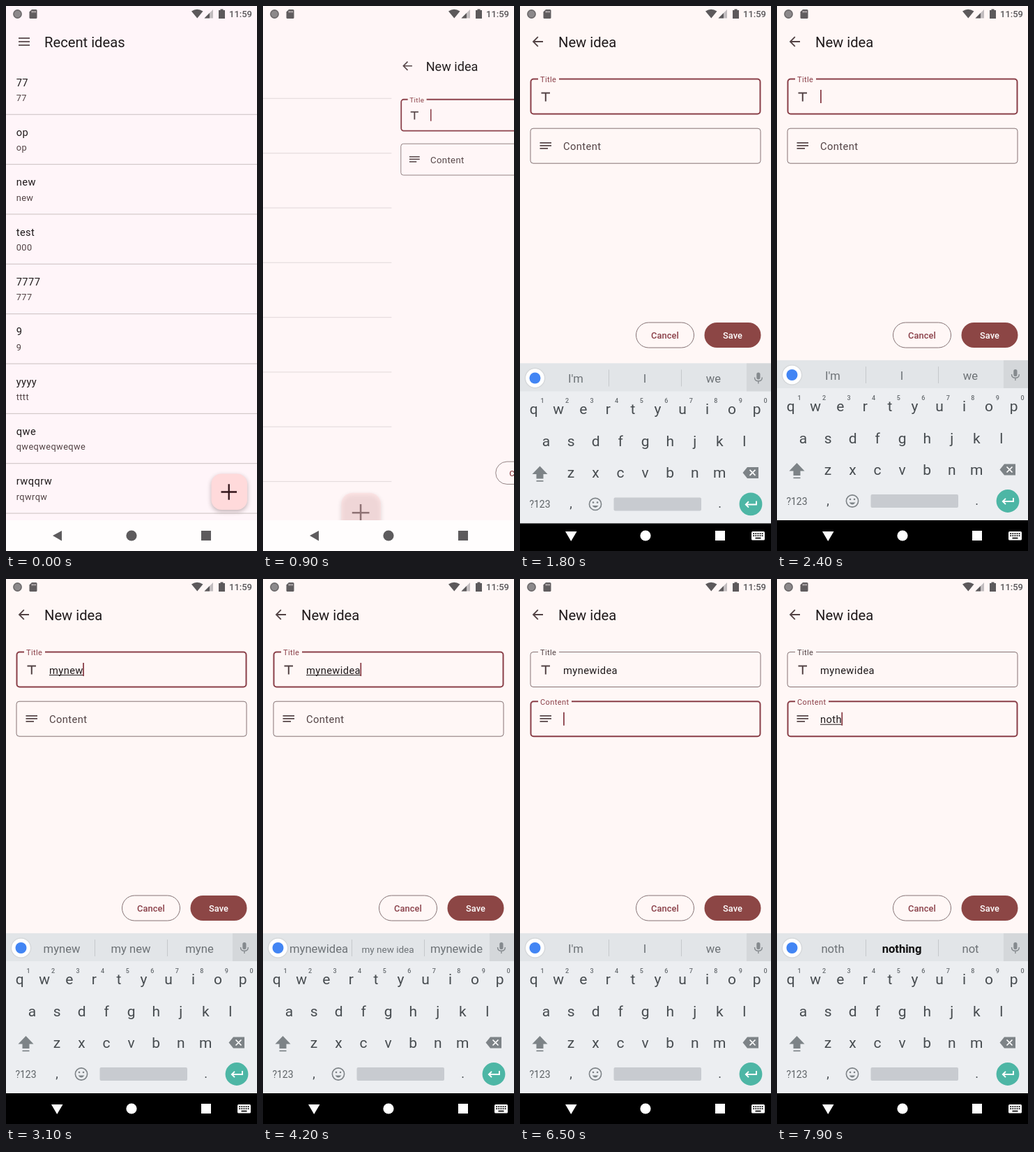
Recreate the animation shown at these times as an HTML page with a canvas. Size 360 by 780 pixels, loop 8 s.

```html
<!DOCTYPE html>
<html lang="en">
<head>
<meta charset="utf-8">
<title>New idea</title>
<style>
html, body { margin: 0; width: 100%; height: 100%; overflow: hidden; background: #fff7f6; }
canvas { display: block; }
</style>
</head>
<body>
<canvas id="stage" width="360" height="780"></canvas>
<script>
const ctx = document.getElementById('stage').getContext('2d');
const LOOP = 8000;
const BG = '#fff7f6', INK = '#1f1a1b', SOFT = '#534345', RED = '#8a3f48', KEY = '#474c50', GREY = '#7d8387';
const ITEMS = [['77', '77'], ['op', 'op'], ['new', 'new'], ['test', '000'], ['7777', '777'], ['9', '9'],
  ['yyyy', 'tttt'], ['qwe', 'qweqweqweqwe'], ['rwqqrw', 'rqwrqw']];

// Key times for each typed character
const TITLE = { word: 'mynewidea', times: [2500, 2600, 2800, 2900, 3000, 3500, 3700, 3800, 4000] };
const CONTENT = { word: 'noth', times: [7500, 7600, 7800, 7900] };
const FOCUS_SWITCH = 4800;
const CARET_OFF = [[1200, 1500], [1700, 2200], [4500, 4800], [5200, 5700], [6200, 6500], [6800, 7100]];
const HINTS = {
  '': ["I'm", 'I', 'we'], m: ['m', 'my', 'me'], my: ['my', 'mom', 'myself'], myn: ['myn', 'my', 'mine'],
  myne: ['myne', 'mine', 'my new'], mynew: ['mynew', 'my new', 'myne'],
  n: ['n', 'no', 'not'], no: ['no', 'not', 'now'], not: ['not', 'nothing', 'note'], noth: ['noth', 'nothing', 'not']
};

const clamp = v => Math.max(0, Math.min(1, v));
const easeInOut = u => u * u * (3 - 2 * u);
const typed = (field, t) => field.word.slice(0, field.times.filter(k => k <= t).length);

function text(str, x, y, size, color, { weight = 400, align = 'left', gap = 0 } = {}) {
  ctx.font = `${weight} ${size}px Roboto, sans-serif`;
  ctx.letterSpacing = gap + 'px';
  ctx.textAlign = align;
  ctx.fillStyle = color;
  ctx.fillText(str, x, y);
  return ctx.measureText(str).width;
}
function rect(x, y, w, h, color) {
  ctx.fillStyle = color;
  ctx.fillRect(x, y, w, h);
}
function round(x, y, w, h, r, fill, stroke, line = 1) {
  ctx.beginPath();
  ctx.roundRect(x, y, w, h, r);
  paint(fill, stroke, line);
}
function circle(x, y, r, fill, stroke, line = 1) {
  ctx.beginPath();
  ctx.arc(x, y, r, 0, 7);
  paint(fill, stroke, line);
}
function path(d, fill, stroke, line = 1) {
  const p = new Path2D(d);
  if (fill) { ctx.fillStyle = fill; ctx.fill(p); }
  if (stroke) { ctx.strokeStyle = stroke; ctx.lineWidth = line; ctx.stroke(p); }
}
function paint(fill, stroke, line) {
  if (fill) { ctx.fillStyle = fill; ctx.fill(); }
  if (stroke) { ctx.strokeStyle = stroke; ctx.lineWidth = line; ctx.stroke(); }
}

function drawStatus() {
  circle(16.5, 11.5, 5.6, '#8c898b', '#6b686a', 1.6);
  path('M37 5H43Q44.5 5 44.5 6.5V16.5Q44.5 18 43 18H35Q33.5 18 33.5 16.5V8.5Z', '#605d5f');
  path('M37.5 7V9.5M39.8 7V9.5M42 7V9.5', null, BG, 0.9);
  path('M266 7.5Q274 1.8 282.5 7.5L274.3 17.5Z', '#5c595b');
  path('M297 5V17.5H284.5Z', '#c2bdbf');
  path('M292 10V17.5H284.5Z', '#5c595b');
  path('M307.5 4.5H311.5V6H314V18H305V6H307.5Z', '#5c595b');
  text('11:59', 320, 16, 13, '#59575a', { weight: 500 });
}

function drawNav(dark) {
  const color = dark ? '#fff' : '#5d5b5d';
  path(dark ? 'M65 752H81.5L73.2 766Z' : 'M67 758L80 751V765.5Z', color);
  circle(180, 758, 7.6, color);
  rect(280, 751, 14, 14, color);
  if (!dark) return;
  round(332, 752, 19, 12.5, 1.5, '#fff');
  for (let row = 0; row < 2; row++)
    for (let col = 0; col < 5; col++) rect(334.3 + col * 3.1, 754.3 + row * 3, 1.8, 1.7, '#000');
  rect(337.5, 760.7, 8, 1.7, '#000');
}

function drawList() {
  for (const y of [46, 51, 56]) rect(18, y - 0.8, 16, 1.7, SOFT);
  text('Recent ideas', 55, 59, 20.2, INK);
  ITEMS.forEach(([title, note], i) => {
    const y = i * 71.35;
    text(title, 14.7, y + 114.5, 14.7, INK, { gap: 0.4 });
    text(note, 14.7, y + 136, 12.8, SOFT, { gap: 0.4 });
    rect(0, y + 154.7, 360, 1.1, '#cfc5c6');
  });
  ctx.save();
  ctx.shadowColor = 'rgba(60,30,35,.32)';
  ctx.shadowBlur = 6;
  ctx.shadowOffsetY = 2.5;
  round(294.5, 669.5, 51.5, 51.5, 14.5, '#ffdadb');
  ctx.restore();
  path('M308.5 695.5H331M319.7 684.3V706.8', null, '#321318', 2.3);
}

function drawField(y, label, labelWidth, focused, float, value, composing, caret) {
  const color = focused ? RED : '#857375';
  round(focused ? 15.5 : 15, y + 0.5, focused ? 329 : 330, 50, 4, null, color, focused ? 2 : 1);
  if (float > 0) rect(26 + labelWidth * (1 - float) / 2, y - 2, labelWidth * float, 5, BG);
  text(label, 62 - 33 * float, y + 31.5 - 26.7 * float, 14.7 - 3.7 * float, focused ? RED : SOFT, { gap: 0.4 });
  const width = value ? text(value, 62, y + 31.5, 14.7, INK, { gap: 0.4 }) : 0;
  if (composing && value) rect(62, y + 33, width, 1, INK);
  if (caret) rect(62 + width - (value ? 0.6 : 0), y + 16, 1.8, 19, RED);
}

function drawForm(t) {
  const onTitle = t < FOCUS_SWITCH;
  const caret = !CARET_OFF.some(([from, to]) => t >= from && t < to);
  path('M33 51H19M25.8 44.2L19 51L25.8 57.8', null, SOFT, 1.8);
  text('New idea', 55, 59, 20.2, INK);
  drawField(104, 'Title', 30, onTitle, 1, typed(TITLE, t), onTitle, onTitle && caret);
  path('M30.5 124.5H43M36.8 124.5V136.5', null, SOFT, 2);
  const float = easeInOut(clamp((t - FOCUS_SWITCH) / 170));
  drawField(174.7, 'Content', 48, !onTitle, float, typed(CONTENT, t), true, !onTitle && caret);
  rect(28.5, 195, 16.5, 1.7, SOFT);
  rect(28.5, 199, 16.5, 1.7, SOFT);
  rect(28.5, 203, 11.5, 1.7, SOFT);

  const y = t < 1700 ? 682 : 453;
  round(166.5, y, 83, 36, 18, null, '#857375');
  text('Cancel', 208, y + 22.8, 12.8, RED, { weight: 500, align: 'center', gap: 0.1 });
  round(264.5, y, 81, 36, 18, '#8c4645');
  text('Save', 305, y + 22.8, 12.8, '#fff', { weight: 500, align: 'center', gap: 0.1 });
}

function drawHints(t) {
  const value = typed(t < FOCUS_SWITCH ? TITLE : CONTENT, t);
  const spaced = value.replace('mynew', 'my new ');
  const hints = HINTS[value] || [value, spaced, value.slice(0, -1)];
  hints.forEach((hint, i) => {
    const bold = value === 'noth' && i === 1;
    const size = hint.length > 9 ? 13.5 : 16.6;
    text(hint, [80, 179, 277.5][i], 534.5, size, bold ? '#111' : '#6d7276',
      { weight: bold ? 700 : 400, align: 'center' });
  });
}

function drawKeyboard(t) {
  rect(0, 507, 360, 230, '#eceef1');
  rect(0, 736, 360, 130, '#000');
  rect(0, 507, 360, 40, '#e2e5e8');
  rect(325, 507, 35, 40, '#d4d7da');
  rect(127, 516, 1, 24, '#c5c8cb');
  rect(231, 516, 1, 24, '#c5c8cb');
  ctx.save();
  ctx.shadowColor = 'rgba(0,0,0,.25)';
  ctx.shadowBlur = 2;
  circle(21.5, 528, 13.5, '#fff');
  ctx.restore();
  circle(21.5, 528, 8, '#4285f4');
  round(339.3, 520, 5.2, 10, 2.6, '#858a8e');
  path('M336.5 527Q336.5 532.3 341.9 532.3Q347.3 532.3 347.3 527M341.9 532.3V536', null, '#858a8e', 1.4);
  drawHints(t);

  const center = { align: 'center' };
  [['qwertyuiop', 19.7, 580], ['asdfghjkl', 37.5, 625.5], ['zxcvbnm', 73, 671]].forEach(([keys, x, y]) =>
    [...keys].forEach((key, i) => text(key, x + i * 35.55, y, 21, KEY, center)));
  [...'1234567890'].forEach((digit, i) => text(digit, 32 + i * 35.55, 563.5, 9, '#666b6f', { weight: 500, align: 'center' }));

  path('M28.5 654L39.5 665.5H33.5V672H23.5V665.5H17.5Z', GREY);
  rect(23.5, 674.5, 10, 1.7, GREY);
  path('M326 655.5H342V671.5H326L319.5 663.5Z', GREY);
  path('M329.5 659.5L337.5 667.5M337.5 659.5L329.5 667.5', null, '#fff', 1.7);
  text('?123', 28.5, 713.5, 14, '#5f6468', center);
  text(',', 73, 714, 18, KEY, center);
  text('.', 286.5, 714, 18, KEY, center);
  circle(108, 708.5, 8.6, null, GREY, 1.6);
  circle(105, 706, 1.3, GREY);
  circle(111, 706, 1.3, GREY);
  path('M103.5 710.5Q108 716.5 112.5 710.5Z', GREY);
  round(134.5, 699, 125.5, 19, 2, '#c8cbd0');
  circle(331, 708.5, 16.4, '#4db6a5');
  path('M339 704V709H324M328 704.8L323.8 709L328 713.2', null, '#fff', 1.9);
}

// Runs draw inside the area between the stage top and the navigation bar
function drawPage(originX, x, scale, alpha, draw) {
  ctx.save();
  ctx.beginPath();
  ctx.rect(0, 0, 360, 736);
  ctx.clip();
  ctx.globalAlpha = alpha;
  ctx.translate(x, 390);
  ctx.scale(scale, scale);
  ctx.translate(-originX, -390);
  draw();
  ctx.restore();
}

function render(t) {
  const p = easeInOut(clamp((t - 655) / 500));
  const edge = 360 * (1 - p);
  rect(0, 0, 360, 780, BG);
  ctx.globalAlpha = 1 - p;
  rect(0, 0, 360, 780, '#fff5f9');
  ctx.globalAlpha = 1;
  if (p < 1) drawPage(360, edge, 1 + 0.2 * p, 1 - p, drawList);
  if (p > 0) drawPage(0, edge, 0.8 + 0.2 * p, Math.min(1, p * 2), () => drawForm(t));
  drawStatus();
  rect(0, 736, 360, 44, '#fffdfd');

  const u = clamp((t - 1550) / 330);
  if (u > 0) {
    ctx.save();
    ctx.globalAlpha = Math.min(1, u * 1.35);
    ctx.translate(0, 78 * (1 - u) ** 2);
    drawKeyboard(t);
    ctx.restore();
  }
  drawNav(u > 0.3);
}

const start = performance.now();
function tick() {
  render((performance.now() - start) % LOOP);
  requestAnimationFrame(tick);
}
tick();
</script>
</body>
</html>
```
